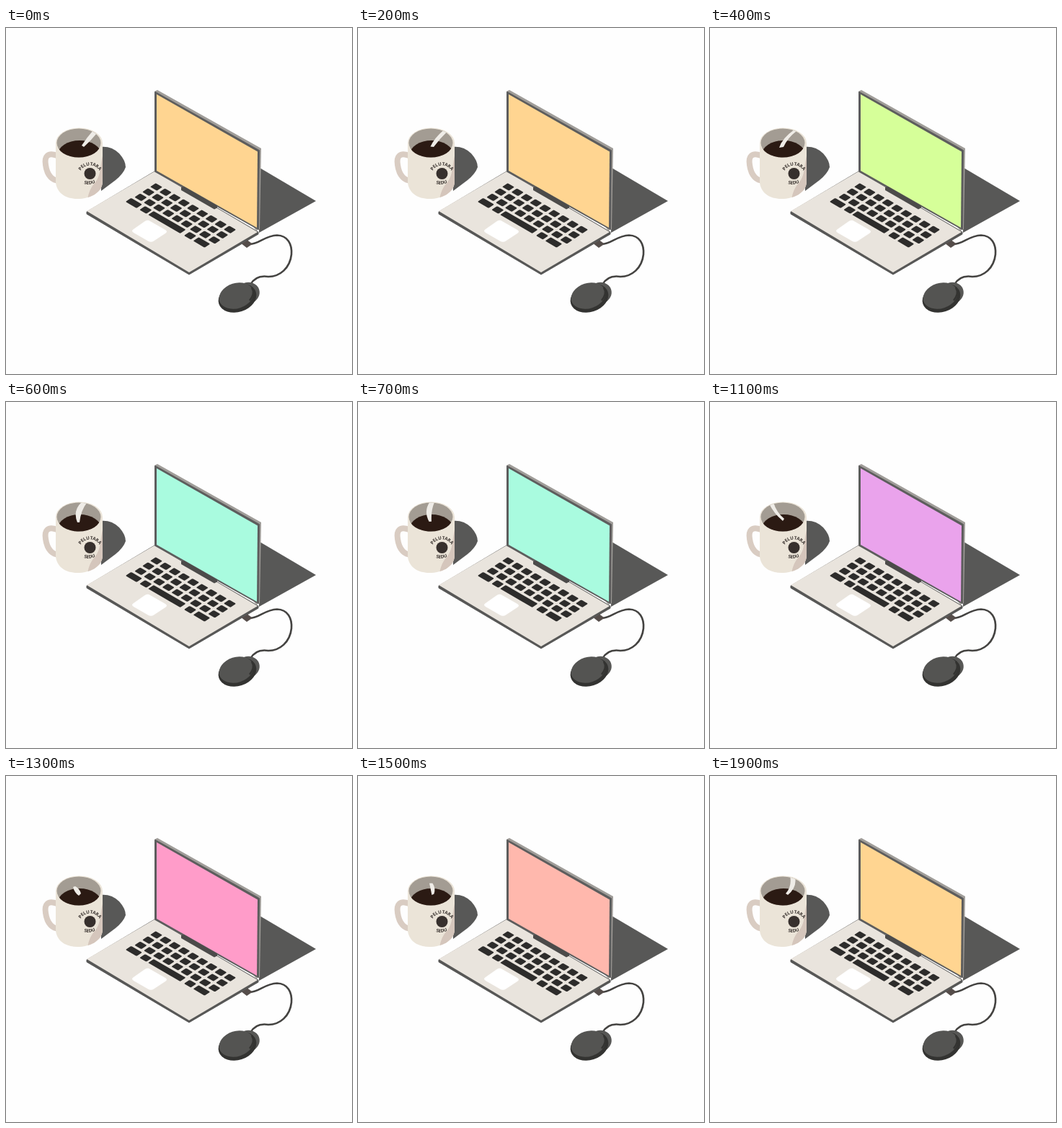
Write an HTML page that moves like this. It is 480 px wide and 480 px high and loops after 2 s.

```html
<!DOCTYPE html>
<html lang="en">
<head>
<meta charset="utf-8">
<title>Desk with laptop and coffee</title>
<style>
  html, body { margin: 0; width: 100%; height: 100%; overflow: hidden; background: #fefefe; }
  svg { display: block; width: 100vw; height: 100vh; }

  .screen { animation: hues 2s step-end infinite; }
  @keyframes hues {
    0%    { fill: #ffd591; }
    15%   { fill: #d6ff99; }
    25%   { fill: #a9fbdf; }
    40%   { fill: #bbcdf8; }
    50%   { fill: #eaa3ec; }
    65%   { fill: #ff9cc9; }
    75%   { fill: #ffb8ad; }
    90%, 100% { fill: #ffd591; }
  }

  /* Ten poses a second: every segment advances in 100 ms steps. */
  .spoon { fill: #efece7; animation: stir 2s infinite; }
  @keyframes stir {
    0%   { d: path("M105 163Q112 152 121 142L126 146Q118 156 108 165Z"); animation-timing-function: steps(4); }
    20%  { d: path("M96 166Q100 153 117 141L120 143Q108 152 102 165Z"); animation-timing-function: steps(2); }
    30%  { d: path("M99 167Q92 150 106 138L112 140Q104 150 102 167Z"); animation-timing-function: steps(3); }
    45%  { d: path("M98 164Q88 155 87 139L94 138Q95 152 102 163Z"); animation-timing-function: steps(2); }
    55%  { d: path("M101 165Q88 154 82 141L88 139Q92 153 103 162Z"); animation-timing-function: steps(2); }
    65%  { d: path("M101 166Q95 162 93 154L96 153Q102 156 104 163Z"); animation-timing-function: steps(6); }
    95%  { d: path("M105 163Q114 153 111 138L118 140Q121 154 108 165Z"); animation-timing-function: steps(1); }
    100% { d: path("M105 163Q112 152 121 142L126 146Q118 156 108 165Z"); }
  }
</style>
</head>
<body>
<svg viewBox="0 0 480 480">
  <defs>
    <clipPath id="opening"><ellipse cx="101" cy="159.500" rx="30.500" ry="20"/></clipPath>
    <clipPath id="body"><path d="M69 159V214C70 228 82 237 99 237S133 229 134 214V159Z"/></clipPath>
    <path id="upper" d="M103 199Q107 191 116 190.500Q126 191 130 199"/>
    <path id="lower" d="M107 216Q116 218.500 125 214"/>
  </defs>

  <g fill="#585857">
    <path d="M130 165Q146 163 157 174Q166 184 166 193Q163 202 152 211L132 226Z"/>
    <path d="M352 194L430 240L351 284Z"/>
  </g>

  <g id="mug">
    <path d="M71 177C58 172 53 178 55 190C57 205 65 213 76 211.500" fill="none" stroke="#d9ccc2" stroke-width="8"/>
    <path d="M69 159V214C70 228 82 237 99 237S133 229 134 214V159Z" fill="#ebe4d8"/>
    <path d="M135 174C130 188 133 204 123 215Q115 224 113 238H135Z" fill="#d5c6bc" clip-path="url(#body)"/>
    <ellipse cx="101.500" cy="159.500" rx="32.500" ry="21" fill="#ebe4d8"/>
    <g clip-path="url(#opening)">
      <rect x="68" y="137" width="66" height="44" fill="#a39c93"/>
      <ellipse cx="102" cy="175.500" rx="30" ry="19.500" fill="#2b1a13"/>
      <path class="spoon" d="M105 163Q112 152 121 142L126 146Q118 156 108 165Z"/>
    </g>
    <circle cx="116.500" cy="202" r="8" fill="#37302d"/>
    <g fill="#37302d" font-family="'Open Sans', sans-serif" font-size="6.200" font-weight="700" text-anchor="middle">
      <text><textPath href="#upper" startOffset="50%">PELUTARA</textPath></text>
      <text><textPath href="#lower" startOffset="50%">SEDU</textPath></text>
    </g>
  </g>

  <g id="laptop" stroke-linejoin="round">
    <path d="M112 255L206 199L350 283V286L254 342L112 258Z" fill="#575756" stroke="#575756"/>
    <path d="M112 254L206 199L349 283L254 339Z" fill="#e9e4dd"/>
    <path d="M206 88L210 86L354 167L352 279L347 281Z" fill="#a09d99"/>
    <path d="M207 89L351 170L350 279L207 199Z" fill="#5d5d5d" stroke="#5d5d5d" stroke-width="2"/>
    <path class="screen" d="M209 92L349 171.500L348 277L209 198Z"/>
    <path d="M243 221L247 220L293 246.500V249.500L289 251.500L243 225Z" fill="#4c4b4a"/>
    <g id="keys" fill="#2d2c2b" transform="matrix(12.75 7.4 -10.8 7.2 208.5 220.5)"/>
    <path d="M200 268L221 280Q225 282.500 221 285L205 295.500Q201 298 197 295.500L177 284Q173 281.500 177 279L192 268.500Q196 265.500 200 268Z" fill="#fff"/>
  </g>

  <g id="mouse">
    <path d="M338 300C351 300 359 288 376 287.500C391 288 397 300 396 314C394 333 380 345 364 345C352 343 344 347 339 356" fill="none" stroke="#444341" stroke-width="2.600"/>
    <path d="M327 299.500L335 294.500L342 299.500L334 305Z" fill="#554d4a"/>
    <ellipse cx="335" cy="368" rx="17" ry="15" fill="#575755" transform="rotate(-20 335 368)"/>
    <ellipse cx="321" cy="374.500" rx="27" ry="19.500" fill="#333331" transform="rotate(-18 321 374.500)"/>
    <ellipse cx="319.500" cy="371.500" rx="24.500" ry="17.500" fill="#545452" transform="rotate(-18 319.500 371.500)"/>
    <path d="M341 360Q346 368 338 378" fill="none" stroke="#333331" stroke-width="2.500"/>
  </g>
</svg>
<script>
  const keys = document.getElementById('keys');

  function addKey(left, right, row) {
    const key = document.createElementNS(keys.namespaceURI, 'rect');
    const box = { x: left, y: row - 0.36, width: right - left, height: 0.72, rx: 0.1 };
    for (const name in box) key.setAttribute(name, box[name]);
    keys.append(key);
  }

  for (let row = 0; row < 3; row++)
    for (let col = 0; col < 9; col++) addKey(col - 0.37, col + 0.37, row);

  [[-0.5, 0.7], [1.02, 1.76], [1.95, 5.45], [5.86, 6.6], [6.85, 8.1]]
    .forEach(([left, right]) => addKey(left, right, 3));
</script>
</body>
</html>
```
